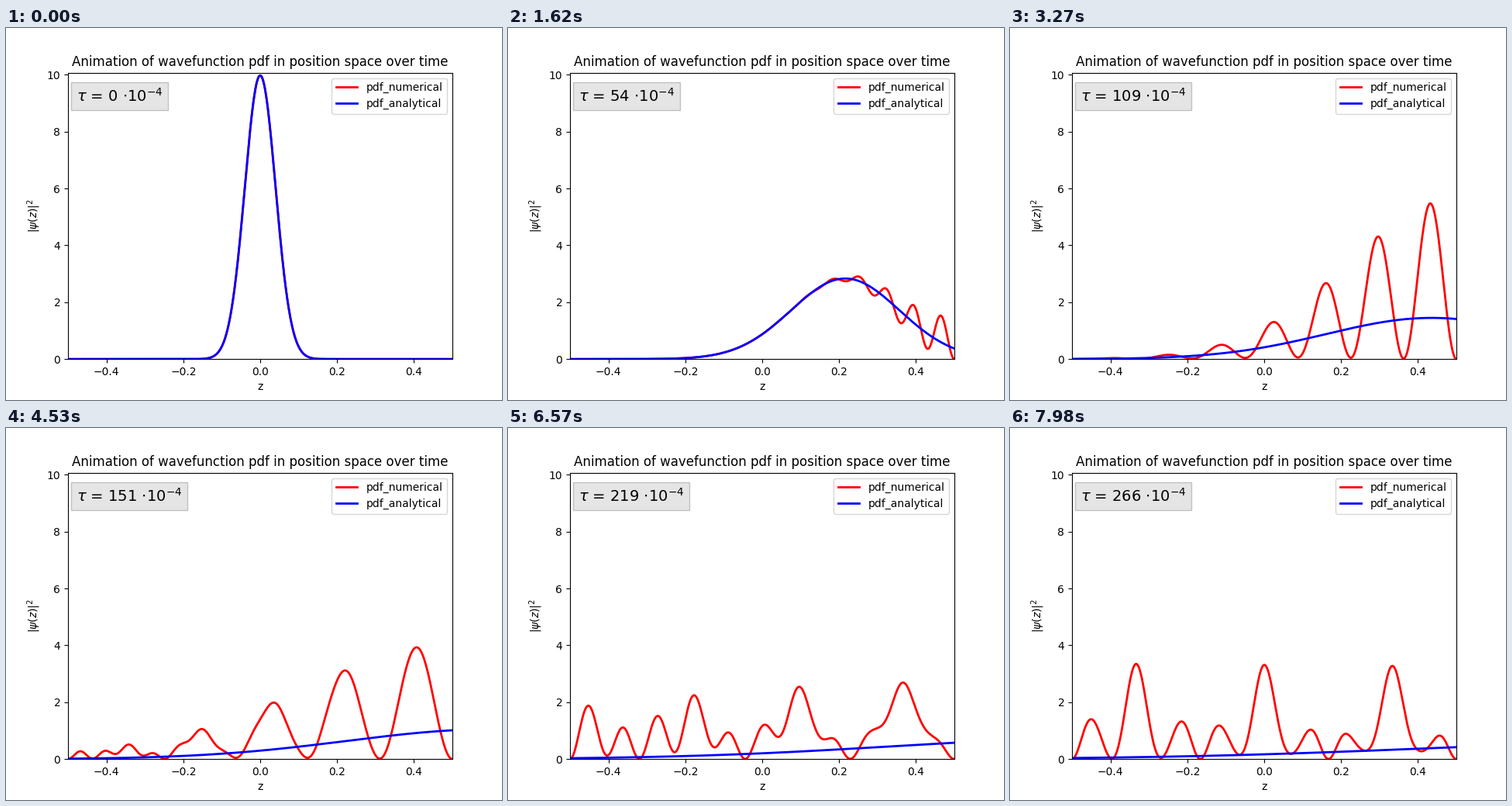
A matplotlib script for the animation above (8 s loop, 640 by 480 pixels).

```python
import numpy as np
import matplotlib.pyplot as plt
from matplotlib.animation import FuncAnimation

SIGMA, K0 = 0.04, 20.0     # initial width and wave number of the packet
DTAU = 1e-4                # simulated time per step
STEP_MS, TICK_MS, LOOP_MS = 30, 20, 8000

z = np.linspace(-0.5, 0.5, 1001)
dz = z[1] - z[0]


def gauss(x, mean, sd):
    return np.exp(-((x - mean) / sd) ** 2 / 2) / (np.sqrt(2 * np.pi) * sd)


# Eigenstates of the unit box, with H = -d2/dz2
kn = np.pi * np.arange(1, 91)
modes = np.sqrt(2) * np.sin(np.outer(z + 0.5, kn))
psi0 = np.sqrt(gauss(z, 0, SIGMA)) * np.exp(1j * K0 * z)
coef = modes.T @ psi0 * dz


def boxed_pdf(tau):
    return np.abs(modes @ (coef * np.exp(-1j * kn**2 * tau))) ** 2


def free_pdf(tau):
    return gauss(z, 2 * K0 * tau, SIGMA * np.hypot(1, tau / SIGMA**2))


fig, ax = plt.subplots(figsize=(6.4, 4.8), dpi=100)
numeric, = ax.plot(z, boxed_pdf(0), color="red", lw=2, label="pdf_numerical")
analytic, = ax.plot(z, free_pdf(0), color="blue", lw=2, label="pdf_analytical")
ax.set_xlim(-0.5, 0.5)
ax.set_ylim(0, 1.01 * free_pdf(0).max())
ax.set_title("Animation of wavefunction pdf in position space over time")
ax.set_xlabel("z")
ax.set_ylabel(r"$|\psi(z)|^2$")
ax.legend(loc="upper right")
clock = ax.text(0.022, 0.9, "", transform=ax.transAxes, fontsize=14,
                bbox={"facecolor": "grey", "alpha": 0.2, "pad": 5})


def update(frame):
    step = (frame * TICK_MS + TICK_MS // 2) // STEP_MS
    tau = step * DTAU
    numeric.set_ydata(boxed_pdf(tau))
    analytic.set_ydata(free_pdf(tau))
    clock.set_text(rf"$\tau$ = {step} $\cdot 10^{{-4}}$")
    return numeric, analytic, clock


anim = FuncAnimation(fig, update, frames=LOOP_MS // TICK_MS, interval=TICK_MS,
                     init_func=lambda: update(0), repeat=True, repeat_delay=0)
plt.show()
```
